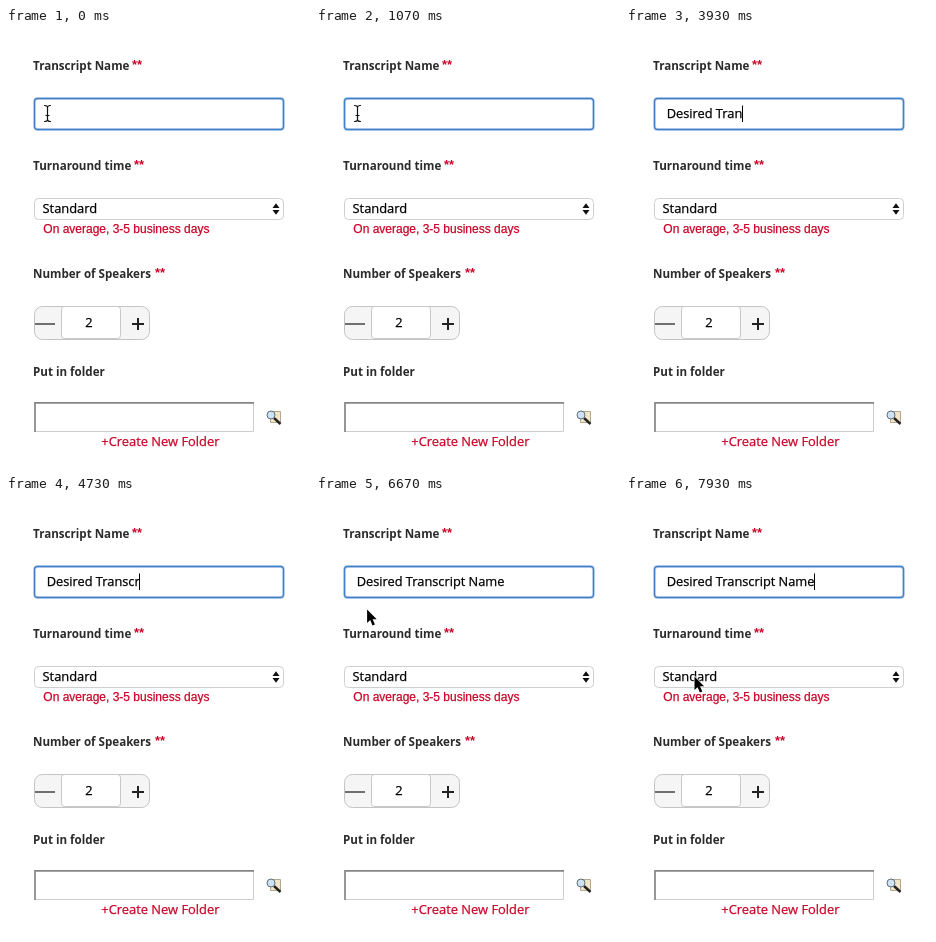
An HTML page for the animation above (8000 ms loop, 304 px wide and 440 px high).

```html
<!DOCTYPE html>
<html lang="en">
<head>
<meta charset="utf-8">
<title>Transcript form</title>
<style>
  html, body { margin: 0; width: 100%; height: 100%; overflow: hidden; background: #fff; }
  svg { display: block; width: 100%; height: 100%; }
  text { font: 12.9px "Open Sans", "Noto Sans", sans-serif; color: #000; fill: currentColor;
    stroke: currentColor; stroke-width: .25px; white-space: pre; }
  #typed { font-size: 12.8px; }
  .label { font-size: 11.6px; font-weight: 700; color: #2b2b2b; stroke: none; }
  .star { font: bold 13px "Liberation Sans", Arial, sans-serif; stroke: none; }
  .note { font: 12px "Liberation Sans", Arial, sans-serif; }
  .red { color: #cb0528; }
</style>
</head>
<body>
<svg viewBox="0 0 304 440">
  <text class="label" x="27" y="42">Transcript Name</text>
  <text class="star red" x="126" y="41">**</text>
  <text class="label" x="27" y="142">Turnaround time</text>
  <text class="star red" x="128" y="141">**</text>
  <text class="label" x="27" y="250">Number of Speakers</text>
  <text class="star red" x="149" y="249">**</text>
  <text class="label" x="27" y="348">Put in folder</text>

  <!-- focused name field -->
  <rect x="28.5" y="70.5" width="249" height="31" rx="3" fill="#fff" stroke="#c6d9f0" stroke-width="3"/>
  <rect x="28.5" y="70.5" width="249" height="31" rx="3" fill="none" stroke="#4480c8" stroke-width="1.3"/>
  <text id="typed" x="40.7" y="90"></text>
  <rect id="caret" y="77.5" width="1" height="16.5"/>

  <!-- turnaround select -->
  <rect x="28.5" y="170.5" width="249" height="21" rx="4" fill="#fff" stroke="#cfcfcf"/>
  <text x="36.5" y="185">Standard</text>
  <path d="M266.5 180l3.5-4.8 3.5 4.8zM266.5 182l3.5 4.8 3.5-4.8z" fill="#111"/>
  <text class="note red" x="37.3" y="205">On average, 3-5 business days</text>

  <!-- speaker stepper -->
  <rect x="28.5" y="278.5" width="115" height="33" rx="8" fill="#f5f5f5" stroke="#c4c4c4"/>
  <rect x="55.5" y="278.5" width="59" height="32" rx="3" fill="#fff" stroke="#c8c8c8"/>
  <path d="M29 296h20" stroke="#707070" stroke-width="2"/>
  <path d="M126 296h12M132 290v12" stroke="#222" stroke-width="2"/>
  <text x="83" y="299" text-anchor="middle">2</text>

  <!-- folder lookup -->
  <path d="M247.5 375v28.5H29" fill="none" stroke="#cdcdcd"/>
  <path d="M29 404V374.8H248" fill="none" stroke="#858585" stroke-width="1.7"/>
  <path d="M264.5 383.5h10v11h-10z" fill="#f3e6c8" stroke="#b3a88c"/>
  <path d="M268 390l6.5 6" stroke="#222" stroke-width="2.4"/>
  <circle cx="265" cy="387" r="4" fill="#cfe2f3" stroke="#5f6f80"/>
  <text class="red" x="95.3" y="418">+Create New Folder</text>

  <g id="beam" fill="none" stroke-linecap="round">
    <path d="M-3 -8Q0 -8 0 -6Q0 -8 3 -8M0 -6V6M-3 8Q0 8 0 6Q0 8 3 8M-1.5 2H1.5" stroke="#111" stroke-width="1.2"/>
  </g>
  <path id="arrow" d="M0 0V13.5L3.1 10.7 5.4 16 7.8 15 5.5 9.8H9.6Z" fill="#000" stroke="#fff" stroke-width="1.4" paint-order="stroke"/>
</svg>
<script>
  const LOOP = 8000;
  const PHRASE = "Desired Transcript Name";
  // One keystroke time per character of the phrase.
  const KEYS = [1670, 1870, 2070, 2270, 2440, 2600, 2800, 2930, 3270, 3470, 3670, 3930,
    4130, 4330, 4600, 4870, 4930, 5000, 5070, 5330, 5470, 5600, 5930];
  const BLINK = 490;
  // Pointer waypoints: time, x, y.
  const PATH = [[6400, 41.5, 85.5], [6730, 52, 116], [7100, 64, 153],
    [7230, 64, 153], [7730, 68.5, 180.5]];

  const [typed, caret, beam, arrow] =
    ["typed", "caret", "beam", "arrow"].map(id => document.getElementById(id));
  const show = (el, on) => el.setAttribute("visibility", on ? "visible" : "hidden");

  function pointerAt(t) {
    const i = PATH.findIndex(p => p[0] > t);
    if (i < 0) return PATH[PATH.length - 1].slice(1);
    if (i === 0) return PATH[0].slice(1);
    const [t0, x0, y0] = PATH[i - 1], [t1, x1, y1] = PATH[i];
    const k = (t - t0) / (t1 - t0), ease = k * k * (3 - 2 * k);
    return [x0 + (x1 - x0) * ease, y0 + (y1 - y0) * ease];
  }

  function draw(t) {
    const count = KEYS.filter(k => k <= t).length;
    const text = PHRASE.slice(0, count);
    if (typed.textContent !== text) typed.textContent = text;
    if (count) caret.setAttribute("x", Math.floor(40.8 + typed.getComputedTextLength()));
    const idle = t - KEYS[count - 1];
    show(caret, count > 0 && Math.floor(idle / BLINK) % 2 === 0);

    // The pointer hides while typing and is an I-beam inside the field.
    const [x, y] = pointerAt(t);
    const visible = t < KEYS[0] || t >= PATH[0][0];
    const inField = y < 102;
    for (const el of [beam, arrow]) el.setAttribute("transform", `translate(${x} ${y})`);
    show(beam, visible && inField);
    show(arrow, visible && !inField);
  }

  const start = performance.now();
  function tick() {
    draw((performance.now() - start) % LOOP);
    requestAnimationFrame(tick);
  }
  tick();
</script>
</body>
</html>
```
